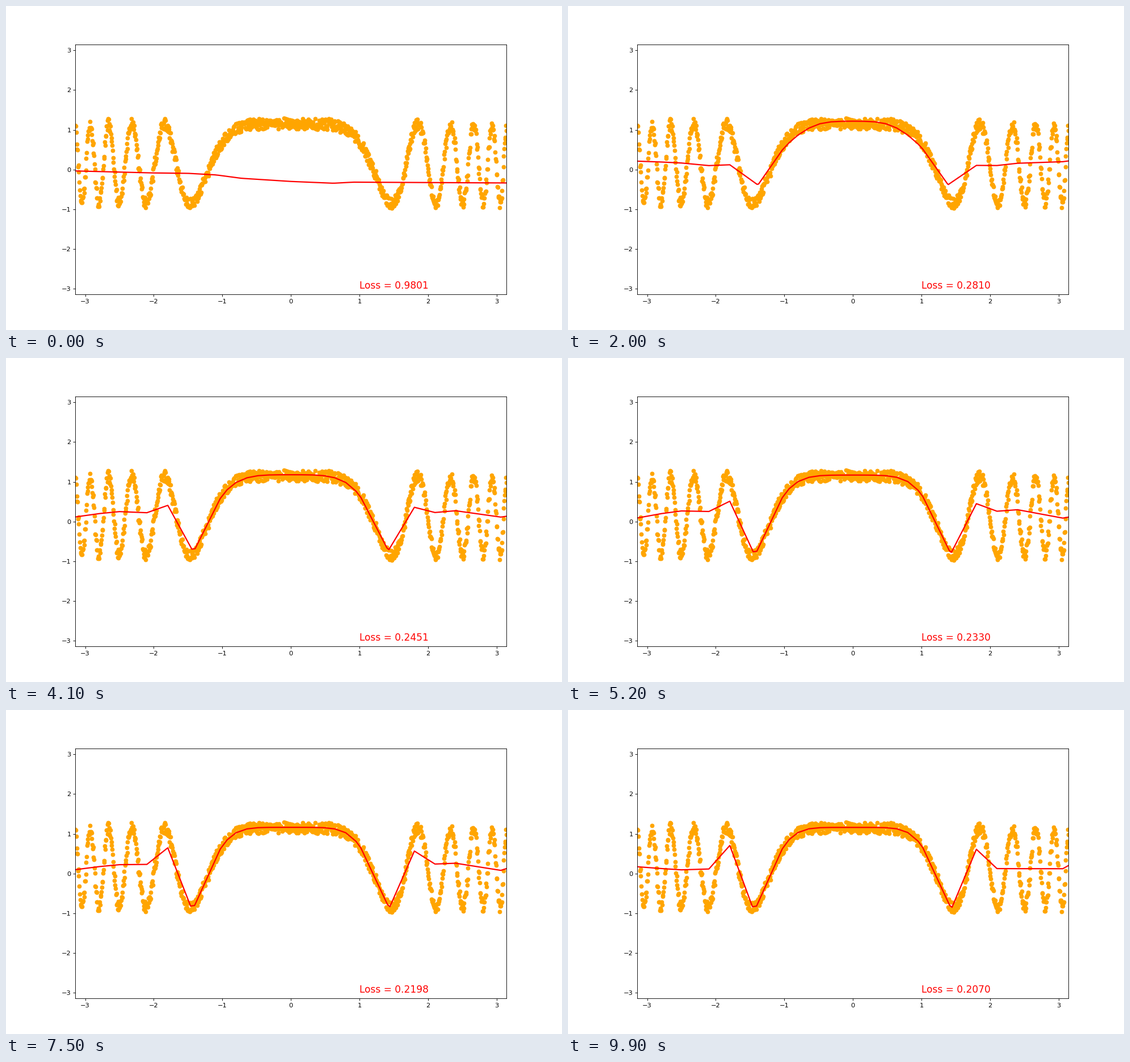
Write a matplotlib script that moves like this. It is 980 px wide and 572 px high and loops after 10 s.

```python
import numpy as np
import matplotlib.pyplot as plt
from matplotlib.animation import FuncAnimation

PI = np.pi
FRAMES = 100
WARMUP = 12          # frames until the central bump has formed
VALLEY_START = 1.36  # where the valleys sit at that moment

plt.rcParams["font.family"] = "DejaVu Sans"
plt.rcParams["font.size"] = 10.25

# Key points of the untrained curve
GUESS = np.array([(-PI, -.036), (-2, -.086), (-1.5, -.096), (-1.09, -.136), (-.72, -.221),
                  (0, -.30), (.62, -.345), (.91, -.318), (PI, -.338)]).T

# Kinks of the trained curve on both sides of the plateau
LEFT = [(-PI, .17), (-2.79, .125), (-2.5, .093), (-2.1, .114),
        (-1.795, .706), (-1.465, -.835), (-1.405, -.82)]
RIGHT = [(1.41, -.80), (1.445, -.85), (1.8, .61), (2.1, .124),
         (2.4, .122), (3.06, .121), (PI, .20)]
PLATEAU = [-1.03, -.93, *np.linspace(-.8, .8, 11), .95, 1.02]

# Slowly falling part of the loss
LOSS_KEYS = np.array([(0, .3301), (12, .3011), (29, .2583), (52, .2330),
                      (75, .2198), (88, .2117), (99, .2070)]).T


def wave(x):
    return np.cos(x ** 3)


def bump(x):
    """Symmetric first fit: a rounded hill between two straight wings."""
    r = np.abs(x)
    hill = 1.25 - 1.6 * .108 * np.logaddexp(0, (r - .51) / .108)
    return np.maximum(hill, .21 * (r - VALLEY_START) - .117)


def ease(i, tau):
    """Exponential approach from 0 after the warm-up to 1 at the end."""
    t = max(0, i - WARMUP)
    return (1 - np.exp(-t / tau)) / (1 - np.exp(-(FRAMES - 1 - WARMUP) / tau))


END_X, END_Y = np.array(LEFT + [(x, wave(x) + .16) for x in PLATEAU] + RIGHT).T
RADIUS = np.abs(END_X)
IS_WING = RADIUS > 1.6
IS_VALLEY = (RADIUS > 1.35) & ~IS_WING
START_X = np.where(IS_VALLEY, np.sign(END_X) * VALLEY_START, END_X)
START_Y = bump(START_X)
GRID = np.linspace(-PI, PI, 100)


def curve(i):
    fast, slow = ease(i, 18), ease(i, 50)
    x = START_X + fast * (END_X - START_X)
    y = START_Y + np.where(IS_WING, slow, fast) * (END_Y - START_Y)

    # The wings arch up and settle again
    p = max(0, i - WARMUP) / (FRAMES - 1 - WARMUP)
    y += IS_WING * .19 * np.sin(PI * p) * np.cos(2.6 * (RADIUS - 2.3))

    xs = np.union1d(x, GRID)
    rest = max(0, 1 - i / WARMUP) ** 2.5
    return xs, rest * np.interp(xs, *GUESS) + (1 - rest) * np.interp(xs, x, y)


def loss(i):
    return np.interp(i, *LOSS_KEYS) + .65 * np.exp(-i / 2)


rng = np.random.default_rng(7)
data_x = np.linspace(-PI, PI, 1000)
data_y = wave(data_x) + rng.uniform(.01, .29, data_x.size)

fig, ax = plt.subplots(figsize=(12.25, 7.15), dpi=80)
fig.subplots_adjust(left=.1249, right=.9, bottom=.11, top=.8806)
ax.set(xlim=(-PI, PI), ylim=(-PI, PI))
ax.scatter(data_x, data_y, color="orange")
line, = ax.plot([], [], "r-", lw=2)
label = ax.text(1, -3, "", size=15.35, color="red")


def update(i):
    line.set_data(*curve(i))
    label.set_text(f"Loss = {loss(i):.4f}")
    return line, label


anim = FuncAnimation(fig, update, frames=FRAMES, interval=100,
                     repeat=True, repeat_delay=0)
plt.show()
```
